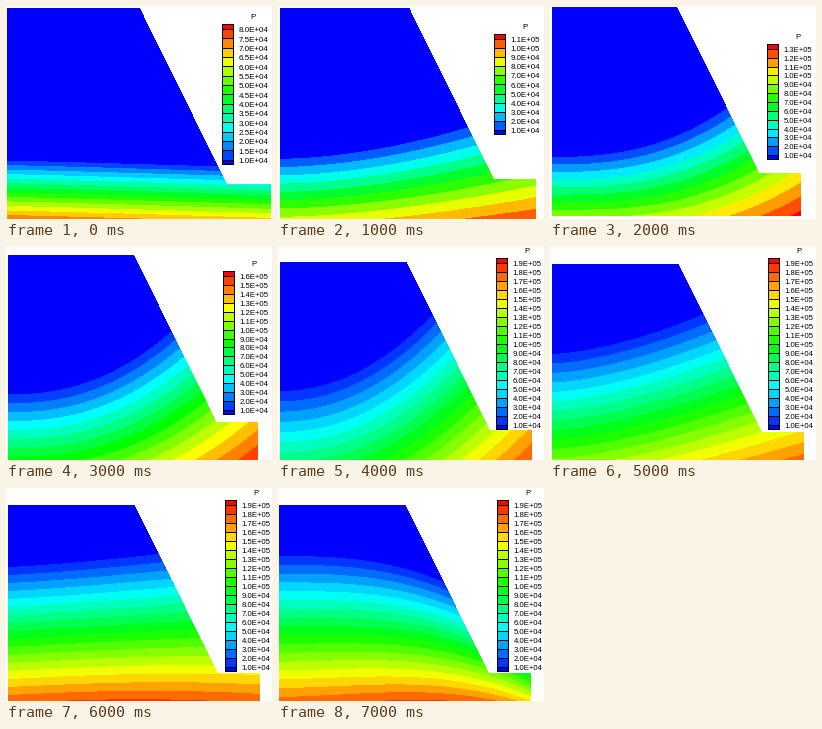
Animation of 266 by 213 pixels, one loop 8000 ms. Source, as a matplotlib script:

```python
import numpy as np
import matplotlib.pyplot as plt
from matplotlib.animation import FuncAnimation

W, H, DPI, COUNT = 266, 213, 64, 8
PX = 72 / DPI  # points per pixel
X, Y = np.meshgrid(np.arange(W) + 0.5, np.arange(H) + 0.5)
RAMP = np.array([[0, 0, 255], [0, 255, 255], [0, 255, 0],
                 [255, 255, 0], [255, 0, 0]])

# key times and values; everything between is interpolated
TRACKS = dict(
    left=([0, 1, 6, 7], [1, 2, 2, 1]),
    top=([0, 2, 4, 5], [2, 1, 15, 17]),
    width=([0, 2, 4], [264, 249, 252]),
    peak=([0, 1, 2, 4], [8, 11, 13, 19]),
    bar_x=([0, 7], [216, 219]),
    bar_y=([0, 2, 4, 7], [18, 38, 11, 12]),
)
# wave of the lowest level: depth at the left, rise to the right edge,
# bend of the curve, then level gap at the left and its growth
WAVE_TIMES = [0, 2, 4, 5, 6, 7]
WAVE = dict(
    depth=[154.5, 151, 144, 107, 79, 68],
    rise=[-7.5, 117, 217, 89, 25, -82],
    bend=[1.1, 2.5, 2.1, 1.6, 1.3, 2.7],
    gap=[9.08, 7.5, 10.3, 9.5, 8, 8.8],
    growth=[0, 6.7, 6.5, 2.3, 1.5, -4.3],
)
TRACKS.update({name: (WAVE_TIMES, values) for name, values in WAVE.items()})


def state(i):
    s = {name: np.interp(i, *track) for name, track in TRACKS.items()}
    s["delta"] = 0.5 if s["peak"] < 10 else 1  # level step in units of 1e4
    s["levels"] = round((s["peak"] - 1) / s["delta"]) + 1
    s["right"] = s["left"] + s["width"]
    s["cell"] = 9 * (s["width"] / 252) ** 0.8
    s["bar_x"], s["bar_y"] = round(s["bar_x"]), round(s["bar_y"])
    s["bar_end"] = s["bar_y"] + int(s["cell"] * s["levels"])
    return s


def palette(levels):
    t = np.linspace(0, 4, levels + 1)
    colors = [np.interp(t, range(5), channel) for channel in RAMP.T]
    return np.stack(colors, 1).round().astype(np.uint8)


def bands(s):
    u = X / s["right"]
    first = s["depth"] - s["rise"] * u ** s["bend"]
    gap = (s["gap"] + s["growth"] * u ** 2) * s["delta"]
    value = 1 + (Y - first) / gap
    return np.clip(np.floor(value), 0, s["levels"]).astype(int)


def inside(s):
    x, y = X - s["left"], Y - s["top"]
    w = s["width"]
    box = (x > 0) & (x < w) & (y > 0) & (y < 0.84 * w)
    return box & ((y > 0.667 * w) | (x < 0.503 * w + 0.495 * y))


def ticks(s):
    # level positions from the bottom up; the end cells are half height
    n = s["levels"]
    height = s["bar_end"] - s["bar_y"]
    return s["bar_end"] - height * (np.arange(n) + 0.5) / n


def render(s):
    colors = palette(s["levels"])
    img = np.full((H, W, 3), 255, np.uint8)
    mask = inside(s)
    img[mask] = colors[bands(s)[mask]]

    left, right = s["bar_x"], s["bar_x"] + 11
    edges = [s["bar_end"], *np.ceil(ticks(s)).astype(int), s["bar_y"]]
    for color, low, high in zip(colors, edges, edges[1:]):
        img[high:low, left:right] = color
    for y in edges:
        img[y, left:right + 1] = 0
    img[edges[-1]:edges[0] + 1, [left, right]] = 0
    return img


fig = plt.figure(figsize=(W / DPI, H / DPI), dpi=DPI, facecolor="white")
ax = fig.add_axes([0, 0, 1, 1])
ax.axis("off")
picture = ax.imshow(np.full((H, W, 3), 255, np.uint8), extent=(0, W, H, 0),
                    interpolation="nearest", aspect="auto")


def label(s, dx, y, text):
    ax.text(s["bar_x"] + dx, y, text, fontsize=0.86 * s["cell"] * PX,
            family="Liberation Sans", color="black", va="center_baseline")


def draw(i):
    s = state(i % COUNT)
    picture.set_data(render(s))
    for old in list(ax.texts):
        old.remove()
    label(s, 28.5, s["bar_y"] - 7.5, "P")
    for k, y in enumerate(ticks(s)):
        label(s, 16.5, y + 1, f"{1e4 * (1 + k * s['delta']):.1E}")
    return [picture, *ax.texts]


anim = FuncAnimation(fig, draw, frames=COUNT, interval=1000,
                     repeat=True, repeat_delay=0, blit=False)
plt.show()
```
